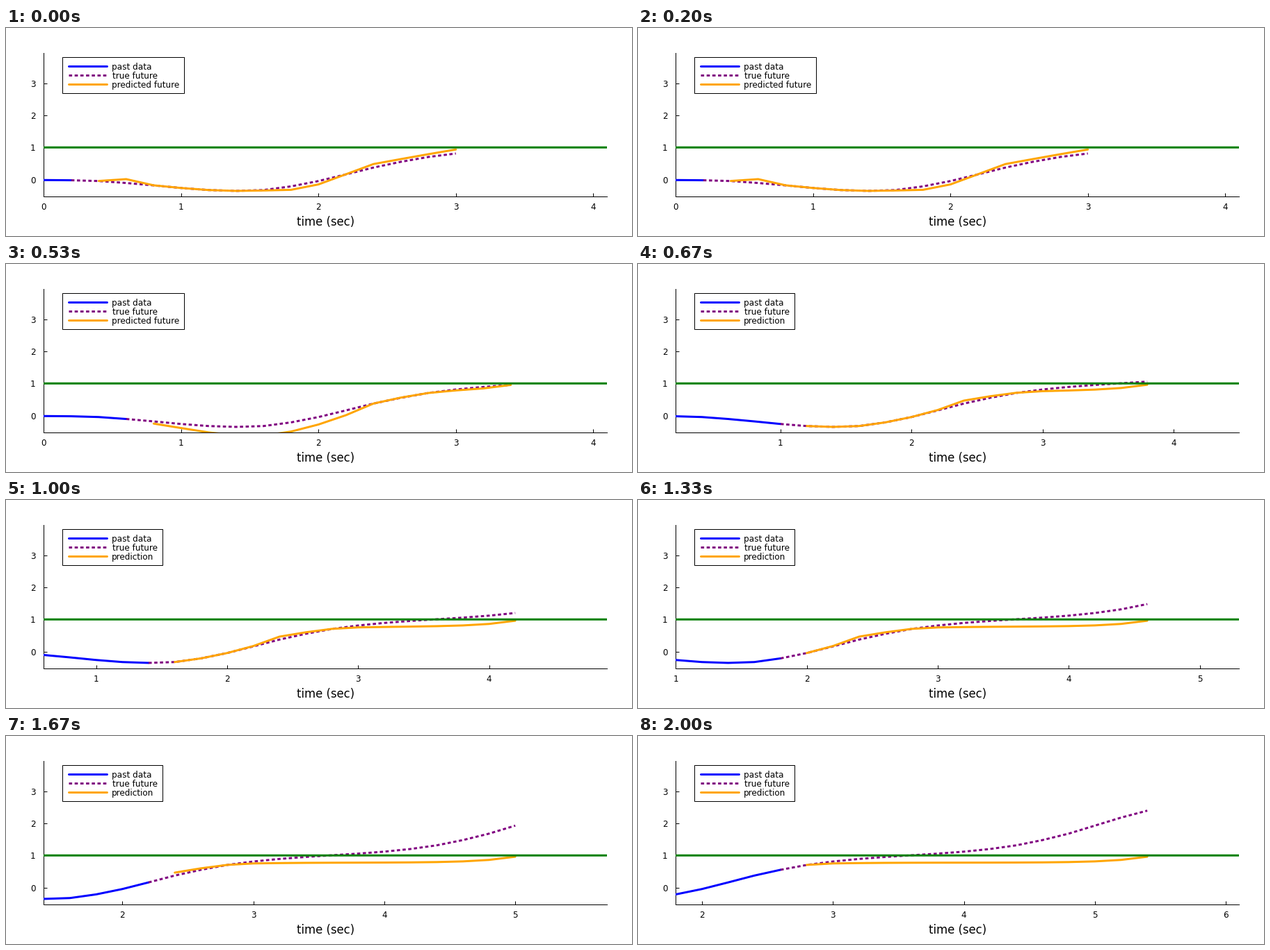
Recreate the animation shown at these times as a matplotlib script. Size 900 by 300 pixels, loop 2.33 s.

```python
import numpy as np
import matplotlib.pyplot as plt
from matplotlib.animation import FuncAnimation
from matplotlib.patches import Rectangle

W, H, DPI = 900, 300, 100
PX = 72 / DPI                       # one pixel in points
LEFT, RIGHT, TOP, BOTTOM = 54.3, 864, 36, 243.2
ZERO, UNIT = 218.5, 46.25           # pixel row of y=0, pixels per unit
TICK_MS, LOOP_MS, VIEWS = 10, 2330, 7
DT, HORIZON = 0.2, 14

# Measured signal: one knot per two samples
KNOTS = np.array([-.017, -.048, -.184, -.329, -.329, -.048, .372, .703,
                  .891, 1.005, 1.118, 1.315, 1.68, 2.18, 2.55])

# Errors of the first forecasts: (time, height, width) of each bump
BUMPS = {0: [(0.6, 0.12, 0.1), (1.9, -0.14, 0.2)],
         1: [(1.65, -0.3, 0.7)]}


def halve(v):
    """Insert a cubic midpoint between neighbouring knots."""
    p = np.concatenate([v[:1], v, v[-1:]])
    mid = (9 * (p[1:-2] + p[2:-1]) - p[:-3] - p[3:]) / 16
    out = np.empty(2 * len(v) - 1)
    out[::2], out[1::2] = v, mid
    return out


truth = halve(KNOTS)
times = np.arange(len(truth)) * DT


def bump(t, centre, height, width):
    return height * np.exp(-((t - centre) / width) ** 2)


def forecast(view, n):
    """Follow the signal up to a plateau, then lift towards 1 at the end."""
    step = np.arange(1, HORIZON + 1)
    t = (n + step) * DT
    plateau = 0.735 + 0.04 * np.tanh(2 * (t - 2.8))
    y = np.minimum(truth[n + step] + bump(t, 2.45, 0.1, 0.17), plateau)
    y += 0.185 * 0.46 ** (HORIZON - step)
    for b in BUMPS.get(view, []):
        y += bump(t, *b)
    return t, y


plt.rcParams["font.family"] = "DejaVu Sans"
fig = plt.figure(figsize=(W / DPI, H / DPI), dpi=DPI, facecolor="white")

ax = fig.add_axes([LEFT / W, 1 - BOTTOM / H, (RIGHT - LEFT) / W, (BOTTOM - TOP) / H])
ax.set_ylim((ZERO - BOTTOM) / UNIT, (ZERO - TOP) / UNIT)
ax.set_yticks(range(4))
ax.spines[["top", "right"]].set_visible(False)
ax.spines[["left", "bottom"]].set(linewidth=PX, zorder=1)
ax.tick_params(direction="in", length=5 * PX, width=PX, labelsize=12 * PX)
ax.tick_params(axis="x", pad=9 * PX)
ax.tick_params(axis="y", pad=12 * PX)

# Overlay in pixel units, y pointing down
stage = fig.add_axes([0, 0, 1, 1])
stage.set(xlim=(0, W), ylim=(H, 0))
stage.axis("off")
stage.text(459.5, 285, "time (sec)", size=16.5 * PX, ha="center", va="baseline")

SOLID = dict(lw=3 * PX, solid_capstyle="round", solid_joinstyle="round")
DASHED = dict(lw=3 * PX, ls=(0, (4.6 / 3, 3.6 / 3)), dash_capstyle="butt")
STYLES = [dict(color="blue", **SOLID),
          dict(color="purple", **DASHED),
          dict(color="orange", **SOLID)]

past, future, guess = [ax.plot([], [], **s)[0] for s in STYLES]
ax.axhline(1, color="green", lw=3 * PX, zorder=3, snap=False)

box = stage.add_patch(Rectangle((81.2, 42.2), 175, 52, fc="white", ec="black", lw=PX))
labels = []
for row, (name, x) in enumerate([("past data", 152.3), ("true future", 153.2), ("", 152.3)]):
    y = 55.2 + 13 * row
    stage.plot([90.2, 144.5], [y, y], **STYLES[row])
    labels.append(stage.text(x, y + 4.6, name, size=12 * PX, va="baseline"))


def draw(i):
    view = int((i * TICK_MS + 5) * VIEWS / LOOP_MS)
    n = 1 + 2 * view                # index of the current sample
    now = n * DT
    lo, hi = max(0, now - 0.8), max(4.1, now + 3.5)

    ax.set_xlim(lo, hi)
    ax.set_xticks(np.arange(np.ceil(lo - 1e-6), hi).astype(int))
    past.set_data(times[:n + 1], truth[:n + 1])
    future.set_data(times[n:n + HORIZON + 1], truth[n:n + HORIZON + 1])
    guess.set_data(*forecast(view, n))

    early = view < 2
    labels[2].set_text("predicted future" if early else "prediction")
    box.set_width(175 if early else 144)
    return past, future, guess, box, labels[2]


anim = FuncAnimation(fig, draw, frames=LOOP_MS // TICK_MS, interval=TICK_MS,
                     repeat=True, repeat_delay=0, blit=False)
plt.show()
```
